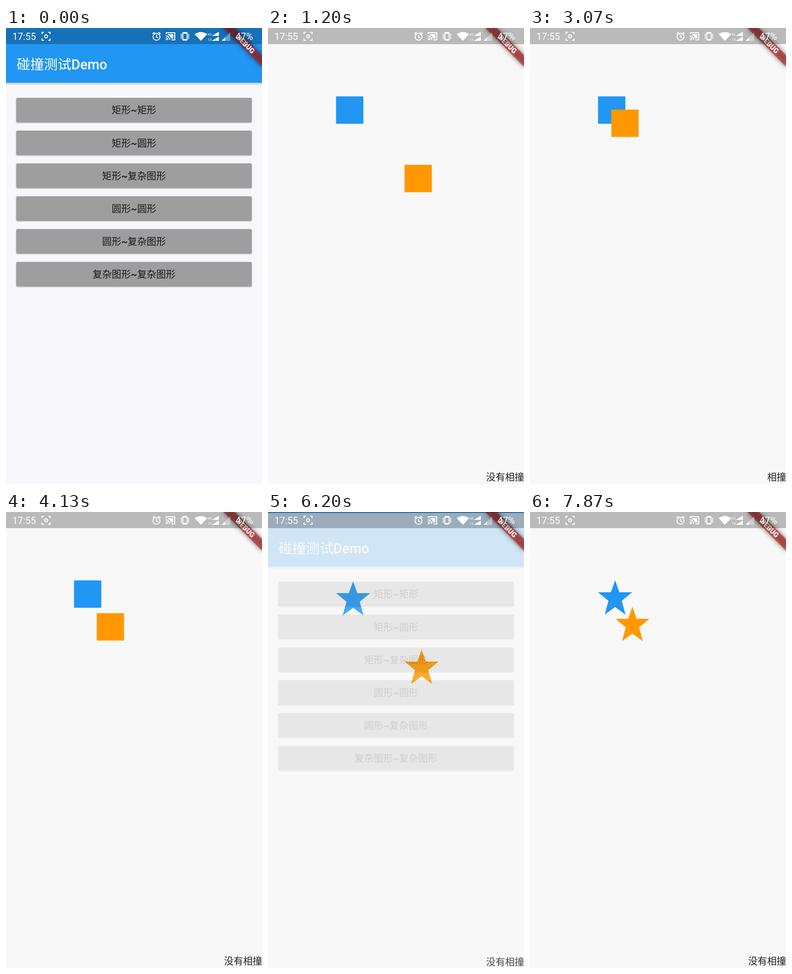
Write an HTML page that moves like this. It is 540 px wide and 960 px high and loops after 8000 ms.

```html
<!DOCTYPE html>
<html lang="zh-CN">
<head>
<meta charset="utf-8">
<title>碰撞测试Demo</title>
<style>
html, body { margin: 0; width: 100%; height: 100%; overflow: hidden; background: #f8f8f8; }
svg { display: block; width: 540px; height: 960px; overflow: hidden; }
text { font-family: Roboto, "Noto Sans CJK SC", "Noto Sans CJK", sans-serif; font-size: 20.16px; white-space: pre; }
.medium { font-weight: 500; }
.bg { fill: #f8f8f8; }
.blue { fill: #2196f3; }
.orange { fill: #ff9800; }
.bar { filter: drop-shadow(0 2px 2.5px rgba(0, 0, 0, .3)); }
.button rect { fill: #9e9e9e; filter: drop-shadow(0 1.5px 1.3px rgba(0, 0, 0, .3)); }
.button text { text-anchor: middle; fill: #161616; }
.message { text-anchor: end; fill: #212121; }
.line { fill: none; stroke: #fff; stroke-width: 2; }

.tint, .page, .slide, .drag, .apart, .hit { animation: 8s linear infinite both; }
.tint { animation-name: tint; }
.rects { animation-name: rects-fade; }
.rects > .slide { animation-name: rects-slide; }
.stars { animation-name: stars-fade; }
.stars > .slide { animation-name: stars-slide; }
.drag { animation-timing-function: ease-in-out; }
.rects .drag { animation-name: rect-drag; }
.stars .drag { animation-name: star-drag; }
.apart { animation-name: apart; animation-timing-function: step-end; }
.hit { animation-name: hit; animation-timing-function: step-end; }

@keyframes tint {
  0%, 13% { fill: #f8f7fb; }
  13.01%, 100% { fill: #f8f8f8; }
}
/* Pages fade in while rising a quarter of the screen; leaving runs this backwards. */
@keyframes rects-fade {
  0%, 9.25% { opacity: 0; animation-timing-function: cubic-bezier(.42, 0, 1, 1); }
  13%, 58.75% { opacity: 1; animation-timing-function: cubic-bezier(0, 0, .58, 1); }
  62.5%, 100% { opacity: 0; }
}
@keyframes rects-slide {
  0%, 9.25% { transform: translateY(240px); animation-timing-function: cubic-bezier(.4, 0, .2, 1); }
  13%, 58.75% { transform: none; animation-timing-function: cubic-bezier(.8, 0, .6, 1); }
  62.5%, 100% { transform: translateY(240px); }
}
@keyframes stars-fade {
  0%, 74.19% { opacity: 0; animation-timing-function: cubic-bezier(.42, 0, 1, 1); }
  77.94%, 100% { opacity: 1; }
}
@keyframes stars-slide {
  0%, 74.19% { transform: translateY(240px); animation-timing-function: cubic-bezier(.4, 0, .2, 1); }
  77.94%, 100% { transform: none; }
}
@keyframes rect-drag {
  0%, 16% { transform: translate(288px, 288px); }
  25% { transform: translate(188px, 222px); }
  28.75% { transform: translate(172px, 182px); }
  32.5% { transform: translate(190px, 222px); }
  35.6% { transform: translate(192px, 222px); }
  39.4% { transform: translate(168px, 163px); }
  43.1% { transform: translate(194px, 218px); }
  46.9% { transform: translate(160px, 160px); }
  51.6%, 100% { transform: translate(191.4px, 213px); }
}
@keyframes star-drag {
  0%, 81.5% { transform: translate(288px, 288px); animation-timing-function: ease-in; }
  86.6% { transform: translate(220px, 264px); animation-timing-function: ease-out; }
  92.5%, 95.5% { transform: translate(182px, 204px); }
  98.4%, 100% { transform: translate(180px, 199.8px); }
}
@keyframes apart {
  0%, 30.6%, 41.7%, 50.1%, 100% { opacity: 1; }
  26.9%, 37.2%, 44.6% { opacity: 0; }
}
@keyframes hit {
  0%, 30.6%, 41.7%, 50.1%, 100% { opacity: 0; }
  26.9%, 37.2%, 44.6% { opacity: 1; }
}
</style>
</head>
<body>
<svg viewBox="0 0 540 960">
  <defs>
    <path id="star" d="M36 0L45 25H72L50 43L58 72L36 56L14 72L22 43L0 25H27Z"/>
    <rect id="square" width="57.6" height="57.6"/>
  </defs>

  <g id="menu">
    <rect class="tint" width="540" height="960"/>
    <rect class="bar blue" x="-10" y="-10" width="560" height="125"/>
    <text x="22.5" y="87" fill="#fff" style="font-size:28.8px">碰撞测试<tspan class="medium">Demo</tspan></text>
  </g>

  <g class="page rects">
    <g class="slide">
      <rect class="bg" width="540" height="960"/>
      <use href="#square" class="blue" x="143.5" y="144"/>
      <use href="#square" class="orange drag"/>
      <text class="message apart" x="540.5" y="953">没有相撞</text>
      <text class="message hit" x="540.5" y="953">相撞</text>
    </g>
  </g>

  <g class="page stars">
    <g class="slide">
      <rect class="bg" width="540" height="960"/>
      <use href="#star" class="blue" x="143.5" y="144"/>
      <use href="#star" class="orange drag"/>
      <text class="message" x="540.5" y="953">没有相撞</text>
    </g>
  </g>

  <g transform="translate(540 0) rotate(45)">
    <rect x="-57.6" y="40.3" width="115.2" height="17.3" opacity=".5" style="filter:blur(5.5px)"/>
    <rect x="-57.6" y="40.3" width="115.2" height="17.3" fill="#b71c1c" fill-opacity=".63"/>
    <text y="54.2" text-anchor="middle" fill="#fff" style="font-size:14.7px;font-weight:900">DEBUG</text>
  </g>

  <g id="status" fill="#fff">
    <rect width="540" height="34" fill="#000" opacity=".25"/>
    <text x="13.5" y="25" style="font-size:20px">17:55</text>
    <text x="484" y="25" style="font-size:20px">47%</text>
    <!-- screen capture -->
    <path class="line" d="M76 13V9H80M89 9H93V13M93 22V26H89M80 26H76V22"/>
    <circle class="line" cx="84.5" cy="17.5" r="3.2"/>
    <!-- alarm -->
    <circle class="line" cx="317.5" cy="18.5" r="7.3"/>
    <path class="line" d="M309 12.5L313.5 8.8M321.5 8.8L326 12.5"/>
    <path class="line" stroke-width="1.5" d="M317.5 14V19L321 21"/>
    <!-- cast -->
    <path class="line" d="M338 13V10H356V25H349"/>
    <path d="M341 13H353V22H348Q346 15 341 14.5Z"/>
    <path class="line" d="M337 16.5A8.5 8.5 0 0 1 345.5 25M337 20.5A4.5 4.5 0 0 1 341.5 25"/>
    <path d="M337 23A2.5 2.5 0 0 1 339.5 25.5H337Z"/>
    <!-- vibrate -->
    <rect class="line" x="373" y="9.5" width="9" height="16" rx="1.5"/>
    <path d="M373 9H382V12H373ZM373 23H382V26H373Z"/>
    <path class="line" style="stroke-width:1.5" d="M370.5 12L369 14.5L370.5 17.5L369 20.5L370.5 23M384.5 12L386 14.5L384.5 17.5L386 20.5L384.5 23"/>
    <!-- wifi and signal -->
    <path d="M398 13Q411 4 424.5 13L411 27Z"/>
    <text x="425" y="16" style="font-size:7px">4G</text>
    <text x="425.5" y="27" style="font-size:7px">1X</text>
    <path d="M449 8V16.5H434ZM449 18V27H434Z"/>
    <path d="M473 9V27H455Z" opacity=".35"/>
    <path d="M462 20V27H455Z"/>
  </g>
</svg>
<script>
const labels = ["矩形~矩形", "矩形~圆形", "矩形~复杂图形", "圆形~圆形", "圆形~复杂图形", "复杂图形~复杂图形"];
document.getElementById("menu").innerHTML += labels.map((label, i) => `
  <g class="button" transform="translate(0 ${146.9 + i * 69.1})">
    <rect x="21.6" width="496.8" height="51.8" rx="2.9"/>
    <text x="270" y="33.6">${label.replace("~", '<tspan class="medium">~</tspan>')}</text>
  </g>`).join("");
</script>
</body>
</html>
```
